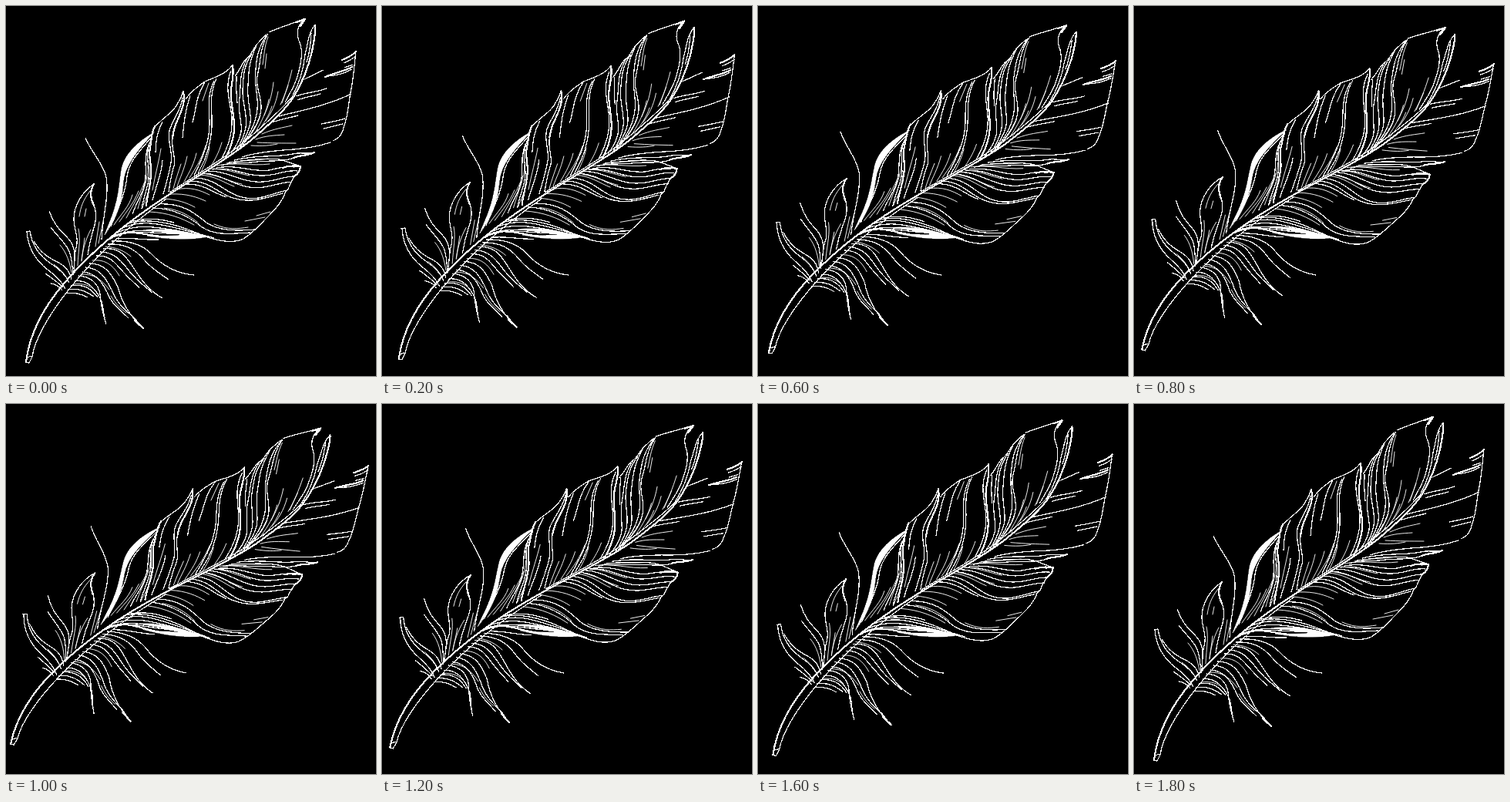
Recreate the animation shown at these times as an HTML page. Size 480 by 480 pixels, loop 2000 ms.

```html
<!DOCTYPE html>
<html lang="en">
<head>
<meta charset="utf-8">
<title>Swaying feather</title>
<style>
  html, body { margin: 0; width: 100%; height: 100%; overflow: hidden; background: #000; }
  svg { display: block; width: 100vw; height: 100vh; }
  #feather { fill: none; stroke: #fff; stroke-width: 1.25; stroke-linecap: round; stroke-linejoin: round; shape-rendering: crispEdges; }
  .bold { stroke-width: 2.2; }
  .fine { stroke-width: .9; }
  .solid { fill: #fff; stroke-width: .6; }
</style>
</head>
<body>
<svg viewBox="0 0 480 480">
<g id="feather">
  <!-- shaft -->
  <g>
    <path class="bold" d="M26 462C30 428 45 395 76 359C106 324 144 289 205 249"/>
    <path d="M26 462L30 463L34 455C37 434 54 402 83 366C112 330 150 292 208 250M27 456L33 454"/>
    <path class="bold" d="M205 249C242 224 286 200 318 174C346 150 364 133 375 115"/>
    <path d="M212 242C250 217 290 194 320 167C342 148 360 131 372 117"/>
    <path class="bold" d="M373 118C385 99 392 80 397 59C399 47 402 37 401 25"/>
    <path d="M401 24C392 35 392 48 388 63C386 83 381 100 371 118M396 35C395 49 395 58 390 73"/>
  </g>

  <!-- left tufts -->
  <g>
    <path d="M27 293C29 316 41 332 54 342C65 350 73 358 77 367"/>
    <path d="M26 293L31 292C34 312 46 326 58 334C71 342 78 350 82 359"/>
    <path d="M36 305C47 324 61 329 70 334C80 340 83 347 85 355"/>
    <path d="M56 266C64 290 78 296 84 306C91 317 89 328 88 345"/>
    <path d="M58 287C67 299 77 307 82 318C86 329 86 338 87 349"/>
    <path d="M51 347C61 354 68 359 74 365M58 360C65 361 70 365 73 369"/>
    <path class="fine" d="M62 335C71 342 76 347 80 355M70 310C79 320 83 334 85 346"/>
  </g>

  <!-- small upper lobe -->
  <g>
    <path d="M114 231C97 242 88 261 88 276C88 291 96 301 90 318L88 341"/>
    <path class="bold" d="M114 231C107 242 111 252 114 259"/>
    <path d="M112 252C119 269 117 279 113 291C110 301 108 308 106 323"/>
    <path d="M103 171C112 192 126 204 130 222C134 247 126 268 124 303"/>
    <path class="fine" d="M109 240C100 252 97 260 95 273M104 263L102 273M94 289C97 303 94 315 93 337M102 301L98 331M110 290C102 305 99 320 98 330M121 280L116 312M127 274L120 308"/>
  </g>

  <!-- first large lobe -->
  <g>
    <path class="solid" d="M192 164C171 176 154 192 150 211C146 235 147 251 133 284L128 297C145 274 151 252 152 229C154 207 170 188 192 164Z"/>
    <path class="bold" d="M193 156C188 166 189 173 187 184C184 197 190 207 188 220C186 239 183 247 182 259"/>
    <path d="M190 169C182 185 183 197 185 209C188 228 179 244 176 263"/>
    <path d="M188 171C172 190 160 201 157 221C155 244 145 263 136 286"/>
    <path d="M185 180C179 196 182 208 181 222C180 241 170 252 164 270"/>
    <path class="fine" d="M184 207C185 226 178 236 171 263M182 222C176 241 168 252 156 275M164 245C160 260 150 269 140 284M172 240C165 257 158 264 147 280M188 229C185 244 180 252 177 262"/>
  </g>

  <!-- second lobe -->
  <g>
    <path d="M193 157C202 146 219 137 224 124C228 119 228 114 230 110"/>
    <path class="bold" d="M230 111C233 126 227 137 223 147C218 156 217 164 216 171"/>
    <path d="M216 171C214 188 222 198 217 211C214 220 213 229 211 241"/>
    <path d="M229 119C226 139 215 149 212 162C209 177 217 190 214 203C212 217 209 226 204 244"/>
    <path d="M203 150C194 168 195 178 194 190M203 200C202 218 196 229 190 252"/>
    <path class="fine" d="M201 185C198 203 194 217 190 239M227 205C223 217 220 226 217 237M235 195C231 213 226 222 222 234"/>
  </g>

  <!-- third lobe -->
  <g>
    <path d="M233 121C240 110 250 104 258 98C269 93 287 88 294 76"/>
    <path class="bold" d="M294 77C297 94 290 104 292 120C294 140 299 155 294 173C292 183 289 189 285 197"/>
    <path d="M292 84C283 106 291 124 293 144C294 163 290 178 280 198"/>
    <path d="M273 94C265 111 266 128 267 143C268 163 265 181 258 199L249 217"/>
    <path d="M270 97C260 118 264 136 264 152C264 174 258 191 244 220"/>
    <path d="M258 99C246 118 247 133 242 151M239 116C232 137 231 151 229 171"/>
    <path class="fine" d="M263 100L255 123M280 177C277 187 274 194 267 206M259 181C253 200 247 209 238 223M264 184C261 199 257 207 253 215M247 191C244 204 239 214 231 228"/>
  </g>

  <!-- top lobe -->
  <g>
    <path d="M297 91C305 81 306 74 312 68C319 64 320 55 327 48C332 43 335 38 340 36"/>
    <path d="M341 34C354 28 369 24 388 16C378 25 376 34 380 45C386 57 383 73 380 84C377 99 370 110 362 125"/>
    <path class="bold" d="M388 17L377 21M388 17L382 26"/>
    <path d="M340 36C329 55 331 69 327 86C322 104 332 117 331 133C330 150 318 165 307 181"/>
    <path d="M338 38C327 55 325 67 324 82C321 103 328 115 326 134C324 154 315 168 303 184"/>
    <path d="M319 62C308 78 308 91 307 108C306 126 314 141 311 157C309 169 304 179 299 187"/>
    <path d="M313 68C302 87 305 104 303 119C300 139 307 150 305 163C303 175 298 182 292 191"/>
    <path d="M325 51C314 75 315 87 314 102C312 124 319 139 317 151C315 165 308 174 303 184"/>
    <path d="M299 91C298 108 299 117 300 126"/>
    <path class="fine" d="M340 40C335 53 335 64 333 76M338 62L336 81M341 121C338 137 332 149 324 163M347 99C345 118 340 130 335 142M353 111C350 128 344 139 337 149M371 83C367 100 363 113 356 128M345 130C341 143 334 153 326 164M330 142C326 156 318 167 310 177M366 103L358 126"/>
  </g>

  <!-- right vane -->
  <g>
    <path d="M454 59C452 76 451 91 448 107C444 126 444 143 438 158C435 169 431 172 424 175"/>
    <path d="M421 177C403 183 381 186 359 187C341 189 323 190 306 196"/>
    <path class="bold" d="M454 59C450 64 443 67 436 70M414 92C428 86 439 85 449 79"/>
    <path d="M454 65C449 69 444 72 438 74M418 91C430 90 440 87 449 82M389 94L412 83M439 80L450 76"/>
    <path d="M376 117C390 112 402 112 416 107M378 122C389 118 398 117 408 114"/>
    <path d="M354 143C380 136 412 131 448 114M345 151C356 147 368 145 379 142"/>
    <path d="M409 153C419 151 430 149 440 146M412 159L437 153"/>
    <path class="fine" d="M385 96L398 90M332 166C348 159 359 158 371 155M324 173C337 168 348 168 361 167M326 177C345 178 359 178 376 178M318 181C333 182 343 181 352 179"/>
  </g>

  <!-- narrow right lobes -->
  <g>
    <path d="M296 200C329 192 350 197 372 192C383 189 391 193 400 190"/>
    <path class="bold" d="M400 190C390 195 382 193 373 197"/>
    <path d="M378 195C363 203 342 200 326 202C308 205 293 202 279 207"/>
    <path d="M289 203C321 199 345 196 359 200L382 208"/>
    <path class="bold" d="M382 208C373 207 366 207 359 210M382 208C381 216 378 218 373 222"/>
    <path d="M374 221C371 226 368 231 366 238L361 243"/>
    <path d="M273 210C300 205 320 216 341 213C352 211 360 207 374 209"/>
    <path d="M268 212C292 208 309 220 330 220C350 221 361 212 378 214"/>
    <path d="M262 214C287 214 302 227 324 228C345 230 357 221 374 221"/>
    <path d="M256 217C281 218 294 233 316 235C338 238 352 229 371 228"/>
    <path class="fine" d="M274 207C295 202 318 208 342 205M265 211C285 211 299 217 316 220M260 218C280 221 294 229 306 231M286 204C307 200 323 201 340 198M251 219C271 220 282 229 296 234"/>
  </g>

  <!-- broad lower lobe -->
  <g>
    <path d="M363 240C358 255 349 264 337 276C327 287 318 296 308 302C293 309 274 304 258 299"/>
    <path d="M246 223C272 224 282 240 302 247C326 255 344 243 365 239"/>
    <path d="M239 227C264 227 275 243 294 249C318 257 339 248 359 243"/>
    <path d="M233 231C257 230 269 243 286 248"/>
    <path d="M198 257C229 255 245 269 260 281C276 292 300 292 323 290"/>
    <path d="M190 262C216 262 239 274 253 286C271 299 294 295 317 294"/>
    <path class="fine" d="M221 238C239 234 252 239 264 245M214 244C234 243 248 248 259 253M205 250C222 251 234 255 245 261M205 262C225 264 238 272 249 281M325 272L343 267M310 279L336 274M270 283C288 291 301 289 314 287M186 267C210 268 228 275 244 284"/>
  </g>

  <!-- dense white plume -->
  <g>
    <path class="solid" d="M178 291C203 287 229 292 264 299C237 304 210 303 183 298C205 299 216 298 232 297C213 293 197 293 178 291Z"/>
    <path class="bold" d="M135 302C155 287 178 297 201 299C222 302 239 302 257 299"/>
    <path d="M144 294C173 281 197 288 221 291L264 300"/>
    <path d="M151 288C178 276 203 284 225 289C242 293 254 297 270 301"/>
    <path d="M158 282C183 275 208 281 228 287L252 296"/>
    <path d="M139 300C165 289 184 295 215 295L250 298"/>
    <path d="M149 295C173 288 197 293 226 295M165 279C187 274 203 277 218 281"/>
    <path d="M145 302C164 300 178 304 198 303"/>
  </g>

  <!-- lower tufts -->
  <g>
    <path d="M137 305C158 304 176 309 188 321C203 337 220 347 244 349"/>
    <path d="M132 309C155 308 168 316 179 329C189 341 197 345 211 355"/>
    <path d="M126 315C150 312 158 329 167 342C178 359 187 370 203 379"/>
    <path d="M122 319C142 319 151 333 160 344C171 358 180 363 190 372"/>
    <path d="M117 324C137 323 143 336 153 346C162 356 168 360 173 366"/>
    <path d="M108 334C131 334 138 351 145 364C150 384 159 401 178 418"/>
    <path d="M103 339C124 340 131 357 137 368C143 385 156 396 166 404L177 418"/>
    <path class="bold" d="M178 418L167 408"/>
    <path d="M99 345C117 346 125 359 131 371C136 386 147 393 159 405"/>
    <path d="M94 350C112 351 120 362 122 374C123 388 126 400 130 413"/>
    <path d="M89 357C108 354 118 370 124 383C127 393 126 398 128 405"/>
    <path d="M84 363C101 360 111 367 119 378M80 368C95 365 105 371 114 377"/>
    <path d="M77 373C90 371 98 374 106 378"/>
    <path class="fine" d="M112 330C130 328 140 338 147 350M97 348C114 347 124 355 134 368M129 312C143 313 154 318 162 325M136 376C143 388 149 393 156 398M87 361C101 359 109 363 116 369"/>
  </g>
</g>
</svg>
<script>
  const feather = document.getElementById("feather");
  const STEP = 200;
  const angles = [0, 1.1, 2.2, 3.2, 4.2, 5.4, 4.2, 2.9, 1.75, 0];

  function draw(now) {
    const angle = angles[Math.floor(now / STEP) % angles.length];
    feather.setAttribute("transform", `rotate(${angle} 240 240)`);
    requestAnimationFrame(draw);
  }
  draw(performance.now());
</script>
</body>
</html>
```
